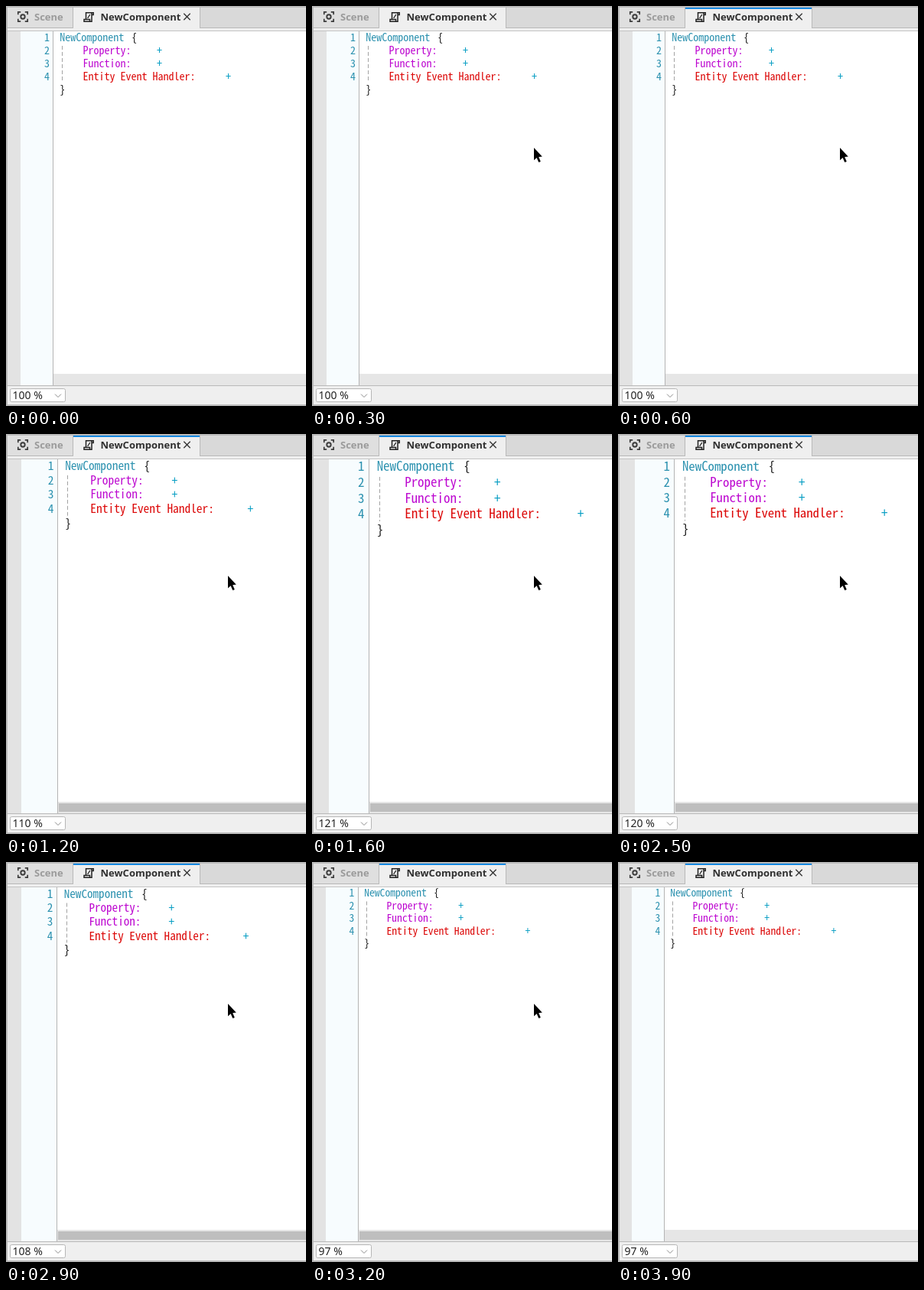
Animation, 392 px wide and 522 px high, one loop 4400 ms. Source, as an HTML page with a canvas:

```html
<!DOCTYPE html>
<html lang="en">
<head>
<meta charset="utf-8">
<title>Editor zoom</title>
<style>
  html, body { margin: 0; width: 100%; height: 100%; overflow: hidden; background: #efefef; }
  canvas { display: block; }
</style>
</head>
<body>
<canvas id="stage" width="392" height="522"></canvas>
<script>
const ctx = document.getElementById('stage').getContext('2d');
const LOOP = 4400, W = 392, H = 522;
const ORIGIN = { x: 2, y: 33 };
const LINE = 17, BOTTOM = 495;
const UI = '"Noto Sans", "Open Sans", sans-serif';
const MONO = '"Noto Sans Mono CJK KR", "Noto Sans Mono CJK JP", "Noto Sans Mono", monospace';

const TEAL = '#2b91af', PLUS = '#0a9fc4', PURPLE = '#bd08d0', RED = '#dc0808', INK = '#111';

// [start ms, value], each held until the next
const ZOOM = [[0, 100], [1200, 110], [1600, 121], [1900, 133], [2500, 120], [2900, 108], [3200, 97]];
const POINTER = [[0, null], [100, [332, 121]], [200, [304, 164]], [300, [290, 185]], [3800, [309, 177]], [3900, null]];

// [text, x, line, colour] at 100 % zoom, relative to the editor corner
const CODE = [
  ['NewComponent', 68.3, 0, TEAL], ['{', 162.2, 0, INK],
  ['Property:', 98.5, 1, PURPLE], ['+', 195, 1, PLUS],
  ['Function:', 98.5, 2, PURPLE], ['+', 195, 2, PLUS],
  ['Entity Event Handler:', 98.5, 3, RED], ['+', 285, 3, PLUS],
  ['}', 68.3, 4, INK]
];

const held = (track, t) => track.filter(([start]) => start <= t).pop()[1];

function box(x, y, w, h, color) {
  ctx.fillStyle = color;
  ctx.fillRect(x, y, w, h);
}

function path(points, color, width, close) {
  ctx.beginPath();
  points.forEach(([x, y]) => ctx.lineTo(x, y));
  if (close) ctx.closePath();
  ctx.strokeStyle = color;
  ctx.lineWidth = width;
  ctx.stroke();
}

function text(str, x, y, font, color, align = 'left') {
  ctx.font = font;
  ctx.textAlign = align;
  ctx.fillStyle = color;
  ctx.fillText(str, x, y);
}

// Font size that gives a 7 px column at 100 %
ctx.font = '100px ' + MONO;
const codeSize = 700 / ctx.measureText('M').width;

function sceneIcon(cx, cy) {
  for (const sx of [-1, 1]) for (const sy of [-1, 1]) {
    path([[cx + sx * 6.2, cy + sy * 2.8], [cx + sx * 6.2, cy + sy * 6.2], [cx + sx * 2.8, cy + sy * 6.2]], '#3c3c3c', 1.7);
  }
  ctx.beginPath();
  ctx.arc(cx, cy, 2.7, 0, Math.PI * 2);
  ctx.lineWidth = 1.9;
  ctx.stroke();
}

function scriptIcon(x, y) {
  path([[x + 3.5, y + 9], [x + 3.5, y + 0.8], [x + 13.2, y + 0.8], [x + 13.2, y + 3.5], [x + 11, y + 3.5]], '#222', 1.5);
  path([[x + 11, y + 1], [x + 11, y + 12.2], [x + 1, y + 12.2], [x + 1, y + 9.6], [x + 8.5, y + 9.6], [x + 8.5, y + 12]], '#222', 1.5);
  path([[x + 5.6, y + 8], [x + 8.8, y + 3.2]], '#222', 1.3);
}

function drawTabs(focused) {
  box(0, 0, W, 33, '#d9d9d9');
  box(2, 2, 85, 26, '#dfdfdf');
  box(0, 28, W, 5, '#efefef');
  box(0, 28, W, 1, '#b9b9b9');
  box(0, 32, W, 1, '#c4c4c4');
  box(0, 0, W, 2, '#b8b8b8');
  box(87, 2, 167, 30, '#efefef');
  box(87, 2, 1, 27, '#b9b9b9');
  box(253, 2, 1, 27, '#b9b9b9');
  if (focused) box(88, 2, 165, 2, '#1487e0');

  sceneIcon(22, 14);
  text('Scene', 37, 19, '600 13px ' + UI, '#9b9b9b');
  scriptIcon(101, 8);
  text('NewComponent', 123.5, 19, '600 13px ' + UI, '#303030');
  path([[232.3, 9.8], [240.7, 18.2]], '#333', 1.3);
  path([[240.7, 9.8], [232.3, 18.2]], '#333', 1.3);
}

function drawEditor(zoom, scrollable) {
  const s = zoom / 100;
  const px = x => ORIGIN.x + x * s;
  const py = y => ORIGIN.y + y * s;
  const margin = Math.floor(px(17)), gutter = Math.round(px(59.3));
  const tall = BOTTOM - ORIGIN.y;

  box(0, ORIGIN.y, W, tall, '#fff');
  box(2, ORIGIN.y, margin - 2, tall, '#e3e3e3');
  box(margin, ORIGIN.y, gutter - margin, tall, '#f7fcfe');
  box(gutter, 480, W - gutter, 15, '#e6e6e6');
  box(gutter, ORIGIN.y, 1, tall, '#b4b4b4');
  if (scrollable) box(gutter + 2, 482, W - gutter - 2, 11, '#bebebe');

  const font = codeSize * s + 'px ' + MONO;
  const base = line => py(line * LINE + 12.7);
  for (let i = 0; i < 4; i++) text(i + 1, px(55), base(i), font, TEAL, 'right');
  for (const [str, x, line, color] of CODE) text(str, px(x), base(line), font, color);

  const guide = Math.floor(px(71.4)) + 0.5;
  ctx.setLineDash([5, 3]);
  path([[guide, py(19)], [guide, py(67)]], '#a3a3a3', 1);
  ctx.setLineDash([]);
}

function drawStatus(zoom) {
  box(0, BOTTOM, W, H - BOTTOM, '#efefef');
  box(0, BOTTOM, W, 1, '#b9b9b9');
  box(0, 520, W, 2, '#b8b8b8');
  ctx.beginPath();
  ctx.roundRect(5.5, 499.5, 72, 17, 2);
  ctx.fillStyle = '#fff';
  ctx.fill();
  ctx.strokeStyle = '#b6b6b6';
  ctx.lineWidth = 1;
  ctx.stroke();
  text(zoom + ' %', 8.5, 513, '14px ' + UI, '#222');
  path([[64, 506.5], [68, 510.5], [72, 506.5]], '#8a8a8a', 1);
}

function drawPointer([x, y]) {
  const shape = [[0, 0], [0, 16.3], [3.6, 13], [6.3, 19], [8.8, 17.9], [6.2, 12], [10.8, 11.5]];
  ctx.beginPath();
  shape.forEach(([dx, dy]) => ctx.lineTo(x + dx, y + dy));
  ctx.closePath();
  ctx.fillStyle = '#000';
  ctx.fill();
}

function draw(t) {
  const zoom = held(ZOOM, t), pointer = held(POINTER, t);
  drawTabs(t >= 600);
  drawEditor(zoom, t >= 1200 && t < 3300);
  drawStatus(zoom);
  box(0, 0, 2, H, '#b8b8b8');
  if (pointer) drawPointer(pointer);
}

function tick() {
  draw(performance.now() % LOOP);
  requestAnimationFrame(tick);
}
tick();
</script>
</body>
</html>
```
